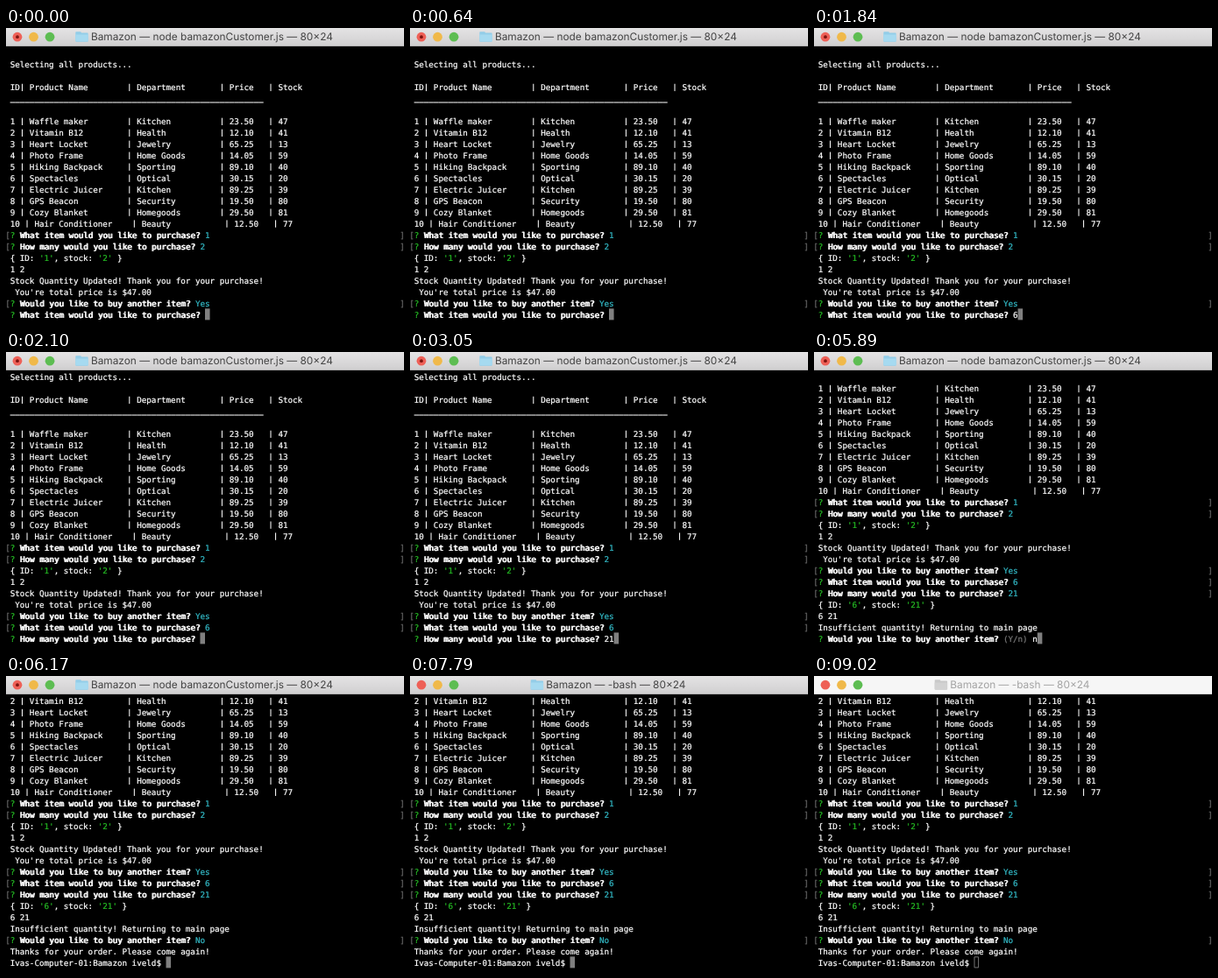
An HTML page with a canvas for the animation above (9.8 s loop, 454x338 px).

```html
<!DOCTYPE html>
<html lang="en">
<head>
<meta charset="utf-8">
<title>Terminal session</title>
<style>
html, body { margin: 0; width: 100%; height: 100%; overflow: hidden; background: #000; }
canvas { display: block; }
</style>
</head>
<body>
<canvas id="stage" width="454" height="338"></canvas>
<script>
const ctx = document.getElementById('stage').getContext('2d');
const LOOP = 9800;
// Window geometry in points; the stage shows it slightly reduced.
const WIDTH = 490, SCALE = 454 / WIDTH;
const CELL = 6, LINE = 14, LEFT = 5, TOP = 24.5, ROWS = 24, BAR = 22.5;
const MONO = '10px "DejaVu Sans Mono", monospace';
const SANS = '12.8px Inter, sans-serif';
const COLOR = {
  text: '#fff', green: '#25bc24', cyan: '#33bbc8',
  dim: '#777', mark: '#686868', cursor: '#7f7f7f'
};
// Rule characters as bars: x, y from the baseline, width, height.
const BARS = { '|': [2.4, -8.2, 1.1, 9], '_': [0, 0.2, CELL, 1.1] };

const plain = text => ({ parts: [[text, 'text']] });
const ask = (question, answer, hint = '') => ({
  parts: [['? ', 'green'], [question + ' ', 'text', true]], answer, hint
});
const order = (id, count) => ({
  parts: [['{ ID: ', 'text'], [`'${id}'`, 'green'], [', stock: ', 'text'],
          [`'${count}'`, 'green'], [' }', 'text']]
});
const tableRow = (id, name, department, price, stock) => plain(
  id + '| ' + name.padEnd(20) + '| ' + department.padEnd(17) + '| ' + price.padEnd(8) + '| ' + stock);

const products = [
  ['Waffle maker', 'Kitchen', '23.50', 47],
  ['Vitamin B12', 'Health', '12.10', 41],
  ['Heart Locket', 'Jewelry', '65.25', 13],
  ['Photo Frame', 'Home Goods', '14.05', 59],
  ['Hiking Backpack', 'Sporting', '89.10', 40],
  ['Spectacles', 'Optical', '30.15', 20],
  ['Electric Juicer', 'Kitchen', '89.25', 39],
  ['GPS Beacon', 'Security', '19.50', 80],
  ['Cozy Blanket', 'Homegoods', '29.50', 81],
  ['Hair Conditioner', 'Beauty', '12.50', 77]
];
const WHICH = 'What item would you like to purchase?';
const COUNT = 'How many would you like to purchase?';
const AGAIN = 'Would you like to buy another item?';

const log = [
  plain(''),
  plain('Selecting all products...'),
  plain(''),
  tableRow('ID', 'Product Name', 'Department', 'Price', 'Stock'),
  plain('_'.repeat(52)),
  plain(''),
  ...products.map((item, i) => tableRow(i + 1 + ' ', ...item)),
  ask(WHICH, '1'),
  ask(COUNT, '2'),
  order(1, 2),
  plain('1 2'),
  plain('Stock Quantity Updated! Thank you for your purchase!'),
  plain(" You're total price is $47.00"),
  ask(AGAIN, 'Yes', '(Y/n) '),
  ask(WHICH, '6'),
  ask(COUNT, '21'),
  order(6, 21),
  plain('6 21'),
  plain('Insufficient quantity! Returning to main page'),
  ask(AGAIN, 'No', '(Y/n) '),
  plain('Thanks for your order. Please come again!'),
  plain('Ivas-Computer-01:Bamazon iveld$ ')
];

// [start time, index of the line being edited, typed text]
const steps = [
  [0, 23, ''], [1840, 23, '6'],
  [2100, 24, ''], [2910, 24, '2'], [3050, 24, '21'],
  [3720, 28, ''], [5890, 28, 'n'],
  [6170, 30, '']
];
const BASH_AT = 6310, BLUR_AT = 8440;
// [from, to, x, y] in stage pixels
const pointerStops = [[7520, 7660, 307.5, 320.5], [7660, 7790, 409, 186.5]];

function drawGlyph(char, x, baseline) {
  if (BARS[char]) {
    const [dx, dy, width, height] = BARS[char];
    ctx.fillRect(x + dx, baseline + dy, width, height);
  } else {
    ctx.fillText(char, x, baseline);
    ctx.strokeText(char, x, baseline);
  }
}

function write(text, col, baseline, color, bold) {
  ctx.fillStyle = ctx.strokeStyle = COLOR[color];
  ctx.lineWidth = 0.25;
  [...text].forEach((char, i) => {
    const x = LEFT + (col + i) * CELL;
    drawGlyph(char, x, baseline);
    if (bold) drawGlyph(char, x + 0.8, baseline);
  });
  return col + text.length;
}

function drawLine(line, row, typed, editing, focused) {
  const top = TOP + row * LINE, baseline = top + 10.5;
  let col = 0;
  for (const [text, color, bold] of line.parts) {
    col = write(text, col, baseline, color, bold);
  }
  if (editing) {
    if (line.hint) col = write(line.hint, col, baseline, 'dim');
    col = write(typed, col, baseline, 'text');
    drawCursor(LEFT + col * CELL, top - 0.7, focused);
  } else if (line.answer) {
    write(line.answer, col, baseline, 'cyan');
    write('[', -0.95, baseline, 'mark');
    write(']', 80, baseline, 'mark');
  }
}

function drawCursor(x, y, focused) {
  if (focused) {
    ctx.fillStyle = COLOR.cursor;
    ctx.fillRect(x, y, CELL, LINE);
  } else {
    ctx.strokeStyle = COLOR.cursor;
    ctx.lineWidth = 1;
    ctx.strokeRect(x + 0.5, y + 0.5, CELL - 1, LINE - 1);
  }
}

function drawFolder(x, y, focused) {
  ctx.fillStyle = focused ? '#93cde8' : '#c9c9c9';
  ctx.beginPath();
  ctx.roundRect(x, y, 7, 4, 1);
  ctx.roundRect(x, y + 1.5, 15.5, 11, 1);
  ctx.fill();
  ctx.fillStyle = focused ? '#a6daf0' : '#d2d2d2';
  ctx.fillRect(x, y + 3.5, 15.5, 8.5);
}

function drawDisc(x, y, radius, color) {
  ctx.fillStyle = color;
  ctx.beginPath();
  ctx.arc(x, y, radius, 0, Math.PI * 2);
  ctx.fill();
}

function drawTitleBar(running, focused) {
  const shade = ctx.createLinearGradient(0, 0, 0, BAR);
  shade.addColorStop(0, focused ? '#e4e3e4' : '#f6f6f6');
  shade.addColorStop(1, focused ? '#d0cfd0' : '#f6f6f6');
  ctx.fillStyle = shade;
  ctx.fillRect(0, 0, WIDTH, BAR);

  ['#ee6057', '#f0b94a', '#5dbd52'].forEach((color, i) => {
    drawDisc(14 + i * 20, 11, 5.8, color);
  });
  if (running) drawDisc(14, 11, 2, '#7d1410');

  ctx.font = SANS;
  const title = `Bamazon — ${running ? 'node bamazonCustomer.js' : '-bash'} — 80×24`;
  const start = (WIDTH - ctx.measureText(title).width + 17) / 2;
  drawFolder(start - 19, 4.5, focused);
  ctx.fillStyle = focused ? '#444' : '#a3a3a3';
  ctx.fillText(title, start, 15.6);
}

function drawPointer(x, y) {
  const outline = [[0, 0], [0, 14], [3.2, 11], [5.2, 15.8], [7.4, 14.8], [5.4, 10.2], [9.6, 10.2]];
  ctx.beginPath();
  outline.forEach(([dx, dy]) => ctx.lineTo(x + dx, y + dy));
  ctx.closePath();
  ctx.fillStyle = '#000';
  ctx.fill();
  ctx.strokeStyle = '#fff';
  ctx.lineWidth = 1;
  ctx.stroke();
}

function draw(time) {
  const focused = time < BLUR_AT;
  const [, last, typed] = steps.findLast(([start]) => start <= time);
  const first = last - ROWS + 1;

  ctx.setTransform(1, 0, 0, 1, 0, 0);
  ctx.fillStyle = '#000';
  ctx.fillRect(0, 0, 454, 338);

  ctx.setTransform(SCALE, 0, 0, SCALE, 0, 0);
  ctx.textRendering = 'geometricPrecision';
  ctx.lineJoin = 'round';
  ctx.font = MONO;
  for (let row = 0; row < ROWS; row++) {
    drawLine(log[first + row], row, typed, row === ROWS - 1, focused);
  }
  drawTitleBar(time < BASH_AT, focused);

  ctx.setTransform(1, 0, 0, 1, 0, 0);
  for (const [from, to, x, y] of pointerStops) {
    if (time >= from && time < to) drawPointer(x, y);
  }
}

const begin = performance.now();
function tick() {
  draw((performance.now() - begin) % LOOP);
  requestAnimationFrame(tick);
}
tick();
</script>
</body>
</html>
```
